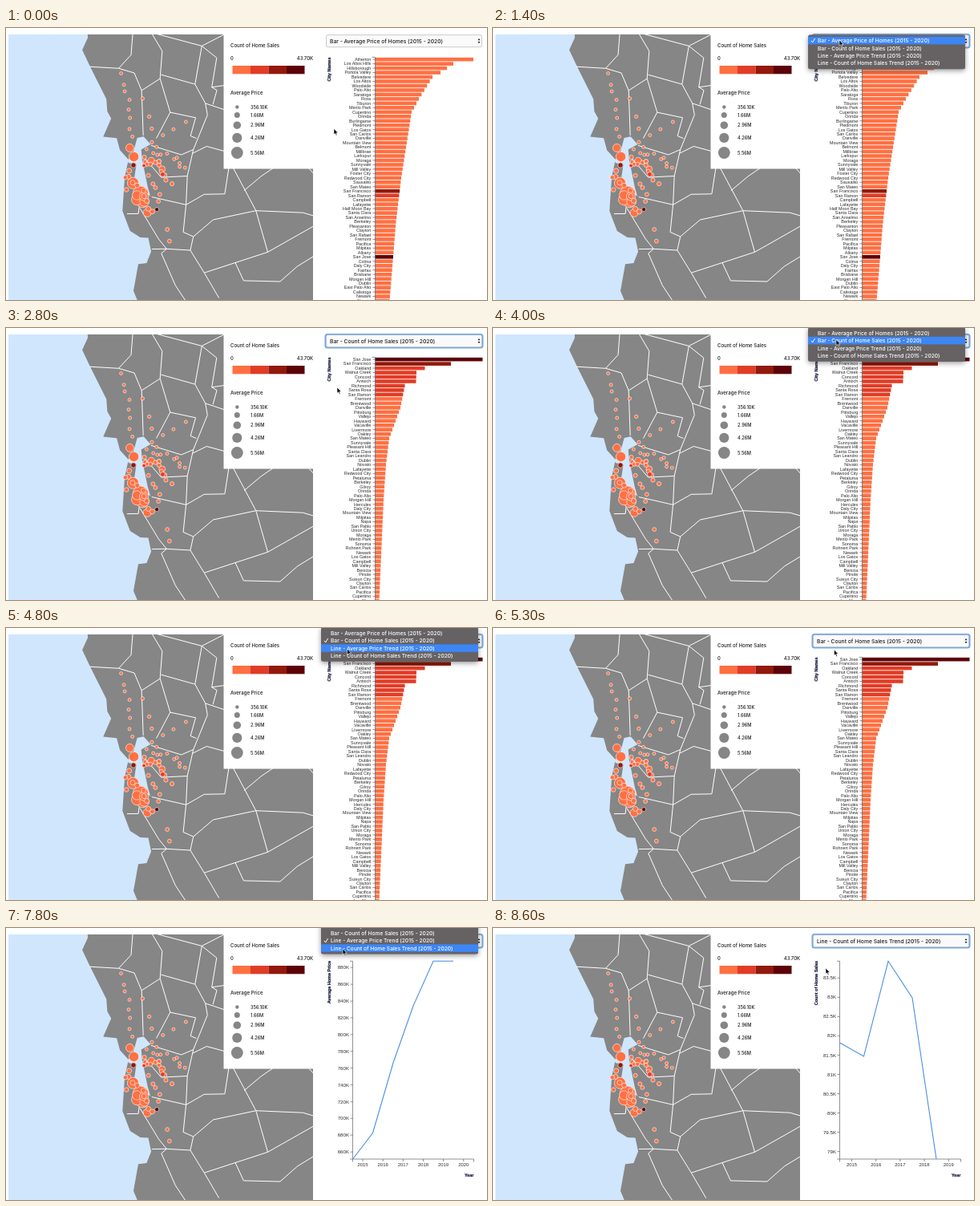
These frames come from a looping animation (600 by 339 pixels, 8700 ms). An HTML page:

```html
<!DOCTYPE html>
<html lang="en">
<head>
<meta charset="utf-8">
<title>Home sales dashboard</title>
<style>
html, body { margin: 0; width: 100%; height: 100%; overflow: hidden; background: #fff; }
svg { display: block; width: 100vw; height: 100vh; }
text { font-family: "Liberation Sans", Arial, sans-serif; fill: #2b2b2b; }
.ui text { font-family: Inter, sans-serif; font-weight: 500; fill: #1c1c1c; }
.ui .light { fill: #fff; }
.end { text-anchor: end; }
.mid { text-anchor: middle; }
.title { font-weight: bold; font-size: 5.5px; fill: #101440; stroke: #101440; stroke-width: .2; }
.axis { fill: none; stroke: #45474f; stroke-width: .6; }
.trend { fill: none; stroke: #4a8fe3; stroke-width: 1.1; }
.border { fill: none; stroke: #fff; stroke-width: 1; stroke-linejoin: round; }
.homes circle { stroke: #fff; stroke-width: .6; }
#menu { filter: drop-shadow(0 2px 3px rgba(0, 0, 0, .4)); }
</style>
</head>
<body>
<svg viewBox="0 0 600 339" preserveAspectRatio="none">
  <defs><clipPath id="frame"><path d="M3 8H383V339H3z"/></clipPath></defs>
  <g clip-path="url(#frame)">
    <path fill="#d0e6fd" d="M3 8H383V339H3z"/>
    <path id="land" fill="#868686"/>
    <path id="bay" fill="#d0e6fd"/>
    <g class="border" id="borders"></g>
    <g class="homes" id="homes"></g>
  </g>
  <g class="ui" id="legend"><path fill="#fff" d="M271.500 7H384V175.500H271.500z"/></g>
  <g id="charts"></g>
  <g class="ui" id="select">
    <rect id="ring" x="398.500" y="8" width="196" height="16.500" rx="2.500" fill="none" stroke="#6fa5ee" stroke-width="2"/>
    <rect x="399.500" y="8.700" width="194" height="15" rx="2" fill="#fafafa" stroke="#b5b5b5" stroke-width=".7"/>
    <path d="M588.500 15.300l1.500-2.300 1.500 2.300zM588.500 17l1.500 2.300 1.500-2.300z" fill="#222"/>
  </g>
  <g class="ui" id="menu"></g>
  <path id="cursor" d="M0 0V7.300L1.700 5.800 2.800 8.400 4 7.900 2.900 5.300H5.200z" fill="#000" stroke="#fff" stroke-width=".6"/>
</svg>
<script>
const LOOP = 8700, STEP = 100;
const ORANGE = '#ff7043', RED = '#e13c26', BROWN = '#92190b', DARK = '#5c0208', GREY = '#868686';
const byId = id => document.getElementById(id);

function add(parent, tag, attrs, content) {
  const node = document.createElementNS('http://www.w3.org/2000/svg', tag);
  for (const key in attrs) node.setAttribute(key, attrs[key]);
  if (content !== undefined) node.textContent = content;
  return parent.appendChild(node);
}
const label = (parent, x, y, size, content, cls = '') =>
  add(parent, 'text', { x, y, 'font-size': size, class: cls }, content);
const path = (parent, d, cls) => add(parent, 'path', { d, class: cls });
const show = (node, on) => { node.style.display = on ? '' : 'none'; };

// Interpolates between stops of the form [position, ...values]
function sample(stops, at, ease = p => p) {
  const next = stops.findIndex(stop => stop[0] > at);
  if (next < 1) return stops.at(next).slice(1);
  const from = stops[next - 1], to = stops[next];
  const p = ease((at - from[0]) / (to[0] - from[0]));
  return from.slice(1).map((v, i) => v + (to[i + 1] - v) * p);
}

// Albers conic projection centred on 96 W, with San Francisco as the anchor
const RAD = Math.PI / 180, SCALE = 5820;
const s1 = Math.sin(29.5 * RAD), s2 = Math.sin(45.5 * RAD), cone = (s1 + s2) / 2;
function albers(west, lat) {
  const rho = SCALE * Math.sqrt(1 + s1 * s2 - 2 * cone * Math.sin(lat * RAD)) / cone;
  const theta = cone * (96 - west) * RAD;
  return [rho * Math.sin(theta), rho * Math.cos(theta)];
}
const [anchorX, anchorY] = albers(122.43, 37.77);
function project([west, lat]) {
  const [x, y] = albers(west, lat);
  return [x - anchorX + 159, y - anchorY + 171];
}
const parse = route => route.split(' ').map(pair => pair.split(',').map(Number));
const trace = route => 'M' + parse(route).map(p => project(p).map(v => v.toFixed(1))).join('L');

// Coast, bay and county lines as degrees west, degrees north
byId('land').setAttribute('d', trace('123.8,39.35 123.69,39.1 123.72,38.94 123.52,38.77 123.13,38.45 123.06,38.31 122.97,38.24 123.01,38 122.8,38.03 122.7,37.9 122.53,37.82 122.51,37.6 122.4,37.2 122.2,36.99 122.02,36.95 121.9,36.97 121.8,36.82 121.82,36.67 121.94,36.63 121.9,36.3 121.6,36') + 'H400V0z');
byId('bay').setAttribute('d', trace('122.56,37.81 122.46,37.86 122.49,37.94 122.49,38.1 122.4,38.14 122.26,38.07 122.38,37.98 122.32,37.86 122.24,37.74 122.12,37.56 122.04,37.46 122.14,37.5 122.36,37.61 122.39,37.79 122.51,37.78') + 'z');
[
  '123.53,38.77 123.08,38.85 122.82,38.85 122.63,38.67 122.41,38.15',
  '123.08,38.85 122.95,39.05 123.1,39.6',
  '122.63,38.67 122.4,38.87 122.49,39.2 122.74,39.38 122.78,39.8',
  '122.4,38.92 121.84,38.92 121.9,39.39 121.62,39.3 121.57,38.94 121.48,38.92 121.48,38.74',
  '122.74,39.38 121.9,39.39 121.6,39.6',
  '122.4,38.87 122.1,38.51 122.2,38.16',
  '122.1,38.51 121.69,38.53 121.69,38.3 121.59,38.29',
  '121.84,38.92 121.6,38.73 121.52,38.6 121.59,38.15 121.75,38.05 122.25,38.06',
  '121.6,38.73 121.13,38.71 121.03,38.51 121.03,38.25',
  '121.57,38.94 121.3,39.03 120.9,39.2',
  '121.59,38.1 121.4,38.23 121,38.23 120.5,38.4 120.07,38.51',
  '121.59,38.15 121.57,37.82 121.96,37.72 122.31,37.9',
  '121.57,37.82 121.47,37.48 122.02,37.46',
  '121,38.23 120.93,37.73 121.24,37.66 121.47,37.48 121.4,37.15 121.23,37.13',
  '120.93,38.08 120.39,37.63 121,37.39 121.23,37.13 121.22,36.96 121.58,36.9',
  '122.11,37.45 122.19,37.42 122.15,37.22 122.32,37.18',
  '122.15,37.29 121.74,36.99 121.58,36.9 121.8,36.85',
  '121.58,36.9 121.64,36.83 121.3,36.5 121.04,36.32 120.6,36.2',
  '121.22,36.96 120.92,36.74 120.6,36.49',
  '120.92,36.74 120.05,37.18 119.3,37.74',
  '120.5,36.96 120.3,36.77 119.75,36.87 119.55,37.1 119.3,37.3',
  '120.39,37.63 120.05,37.18', '120.39,37.63 119.67,37.75 119.3,37.74',
  '120.65,37.83 120.45,38.05 120.02,38.43 119.2,38'
].forEach(route => path(byId('borders'), trace(route)));

function bubble(place, price, fill = ORANGE) {
  const [cx, cy] = project(place);
  add(byId('homes'), 'circle', { cx, cy, r: 1.2 + 1.53 * price, fill });
}
// Prices in millions
Object.entries({
  Atherton: [122.2, 37.46, 5.56], 'Los Altos Hills': [122.14, 37.38, 4.4], Hillsborough: [122.36, 37.56, 3.87],
  'Portola Valley': [122.23, 37.38, 3.7], Belvedere: [122.46, 37.87, 3.25], Woodside: [122.25, 37.43, 2.95],
  'Los Altos': [122.11, 37.38, 3], 'Palo Alto': [122.14, 37.44, 2.8], Saratoga: [122.02, 37.26, 2.55],
  Ross: [122.56, 37.96, 2.48], Orinda: [122.18, 37.88, 2.05], Danville: [121.98, 37.82, 1.75]
}).forEach(([, [west, lat, price]]) => bubble([west, lat], price));

// Smaller towns strung along the main roads
let seed = 7;
const jitter = amount => {
  seed = seed * 16807 % 2147483647;
  return (seed / 2147483647 - .5) * amount;
};
[
  ['123.02,38.8 122.75,38.45 122.57,38.1', 8, .5],
  ['122.58,38.58 122.29,38.3 122.25,38.1', 4, .6],
  ['121.82,38.45 122.04,38.25 122.16,38.06', 4, .5],
  ['122.3,38 122.03,37.98 121.8,38 121.64,37.91', 10, .5],
  ['122.3,37.9 122.22,37.83 122.06,37.9', 6, .9],
  ['122.06,37.9 121.95,37.76 121.77,37.68', 6, .9],
  ['122.16,37.7 121.98,37.55 121.9,37.43', 5, .8],
  ['122.47,37.69 122.32,37.56 122.08,37.39 121.95,37.29', 9, 1.2],
  ['122.5,37.6 122.43,37.46', 2, 1],
  ['121.65,37.13 121.57,37', 2, .8]
].forEach(([route, towns, price]) => {
  const stops = parse(route).map((place, i) => [i, ...place]);
  for (let i = 0; i < towns; i++) {
    const [west, lat] = sample(stops, i / (towns - 1) * (stops.length - 1));
    const shift = i % (towns - 1) ? .08 : 0;
    bubble([west + jitter(shift), lat + jitter(shift)], price);
  }
});
bubble([122.27, 37.8], .75, RED);
bubble([121.95, 37.76], 1.1, RED);
bubble([122.43, 37.77], 1.3, BROWN);
bubble([121.89, 37.33], .9, DARK);

// Legend
const legend = byId('legend');
label(legend, 280, 24.300, 6.050, 'Count of Home Sales');
label(legend, 280, 40, 5.800, '0');
label(legend, 383, 40, 5.900, '43.70K', 'end');
[ORANGE, RED, BROWN, DARK].forEach((fill, i) =>
  add(legend, 'rect', { x: 282.500 + i * 22.500, y: 47, width: 22.500, height: 10.300, fill }));
label(legend, 280, 83.200, 6.100, 'Average Price');
let dotY = 98.500;
['356.10K', '1.66M', '2.96M', '4.26M', '5.56M'].forEach((value, i) => {
  const r = 2.200 + i * 1.300;
  add(legend, 'circle', { cx: 288.300, cy: dotY, r, fill: GREY });
  label(legend, 305, dotY + 2.100, 5.650, value);
  dotY += 2 * r + 5.500 + i * .3;
});

// Charts
function sideTitle(chart, content, top) {
  const node = label(chart, 0, 0, 5.500, content, 'title end');
  node.setAttribute('transform', `translate(405 ${top}) rotate(-90)`);
}

function barChart(cities, curve) {
  const chart = add(byId('charts'), 'g');
  let ticks = 'M456.500 36.400H460.500V339';
  cities.split(',').forEach((city, i) => {
    const y = 39.100 + i * 5.470;
    add(chart, 'rect', { x: 460.500, y: y - 2.250, width: sample(curve, i)[0], height: 4.600, fill: barColors[city] || ORANGE });
    label(chart, 455.300, y + 1.900, 5.400, city, 'end');
    ticks += `M457.500 ${y}H460.500`;
  });
  path(chart, ticks, 'axis');
  sideTitle(chart, 'City Names', 36.500);
  return chart;
}

function lineChart({ title, top, gap, rows, value, firstYear, yearGap, years, line }) {
  const chart = add(byId('charts'), 'g');
  let ticks = 'M429 41.300H432.500V288H429M432.500 291.500V288H583.500V291.500';
  for (let i = 0; i < rows; i++) {
    const y = top + i * gap;
    label(chart, 428, y + 2.100, 6.150, value(i), 'end');
    ticks += `M429.500 ${y}H432.500`;
  }
  for (let i = 0; i < years; i++) {
    const x = firstYear + i * yearGap;
    label(chart, x, 297.300, 5.900, 2015 + i, 'mid');
    ticks += `M${x} 288V291`;
  }
  path(chart, ticks, 'axis');
  path(chart, line, 'trend');
  sideTitle(chart, title, 41);
  label(chart, 583.500, 310, 5.500, 'Year', 'title end');
  return chart;
}

const barColors = { 'San Jose': DARK, 'San Francisco': BROWN };
for (const city of ['Oakland', 'Walnut Creek', 'Concord', 'Antioch', 'Richmond', 'Santa Rosa', 'San Ramon']) barColors[city] = RED;

const charts = [
  barChart('Atherton,Los Altos Hills,Hillsborough,Portola Valley,Belvedere,Los Altos,Woodside,Palo Alto,Saratoga,Ross,Tiburon,Menlo Park,Cupertino,Orinda,Burlingame,Piedmont,Los Gatos,San Carlos,Danville,Mountain View,Belmont,Millbrae,Larkspur,Moraga,Sunnyvale,Mill Valley,Foster City,Redwood City,Sausalito,San Mateo,San Francisco,San Ramon,Campbell,Lafayette,Half Moon Bay,Santa Clara,San Anselmo,Berkeley,Pleasanton,Clayton,San Rafael,Fremont,Pacifica,Milpitas,Albany,San Jose,Colma,Daly City,Fairfax,Brisbane,Morgan Hill,Dublin,East Palo Alto,Calistoga,Newark,Novato',
    [[0, 122.5], [1, 97.5], [3, 81.5], [4, 71.5], [9, 54.5], [12, 45.5], [27, 32.5], [37, 26], [55, 18]]),
  barChart('San Jose,San Francisco,Oakland,Walnut Creek,Concord,Antioch,Richmond,Santa Rosa,San Ramon,Fremont,Brentwood,Danville,Pittsburg,Vallejo,Hayward,Vacaville,Livermore,Oakley,San Mateo,Sunnyvale,Pleasant Hill,Santa Clara,San Leandro,Dublin,Novato,Lafayette,Redwood City,Petaluma,Berkeley,Gilroy,Orinda,Palo Alto,Morgan Hill,Hercules,Daly City,Mountain View,Milpitas,Napa,San Pablo,Union City,Moraga,Menlo Park,Sonoma,Rohnert Park,Newark,Los Gatos,Campbell,Mill Valley,Benicia,Pinole,Suisun City,Clayton,San Carlos,Pacifica,Cupertino,Los Altos',
    [[0, 134], [1, 94.5], [2, 62], [3, 51.5], [5, 51], [6, 37], [11, 31.5], [18, 17.5], [24, 13.5], [32, 10.5], [55, 5]]),
  lineChart({
    title: 'Average Home Price', top: 49.200, gap: 20.900, rows: 12, value: i => `${880 - i * 20}K`,
    firstYear: 445, yearGap: 25.150, years: 6,
    line: 'M432.500 288L457.500 255.500 483 168 508 97 533 41.300H558'
  }),
  lineChart({
    title: 'Count of Home Sales', top: 62.300, gap: 24.030, rows: 10, value: i => `${83.5 - i / 2}K`,
    firstYear: 447.500, yearGap: 30.200, years: 5,
    line: 'M432.500 143L462.500 160 493 41.300 523 87 553 288'
  })
];

// Dropdown
const options = [
  'Bar - Average Price of Homes (2015 - 2020)', 'Bar - Count of Home Sales (2015 - 2020)',
  'Line - Average Price Trend (2015 - 2020)', 'Line - Count of Home Sales Trend (2015 - 2020)'
];
const ROW = 9.450;
const choice = label(byId('select'), 404, 18.500, 6.740, '');
const menu = byId('menu');
add(menu, 'rect', { x: 393, y: 8.500, width: 196, height: 42.800, rx: 2.500, fill: '#666263' });
const highlight = add(menu, 'rect', { x: 393, width: 196, height: ROW, fill: '#3d86f6' });
options.forEach((option, i) => label(menu, 405, 18.100 + i * ROW, 6.670, option, 'light'));
const check = add(menu, 'path', { d: 'M397 15.800l1.600 2.200 3-5', fill: 'none', stroke: '#fff', 'stroke-width': 1 });

// Timeline
const changes = [0, 2300, 5400, 8100];
const menus = [
  { open: 1100, move: 1800, close: 2200 },
  { open: 3700, move: 4500, close: 5200 },
  { open: 6700, move: 7300, close: 7900 }
];
const pointer = [
  [0, 409, 125.5], [200, 409, 125.5], [900, 432, 15], [1500, 432, 15], [1900, 431, 25], [2200, 431, 25],
  [2700, 413, 74], [3100, 413, 74], [3600, 428, 14.5], [4200, 428, 14.5], [4700, 425.5, 26], [5300, 425.5, 27],
  [5700, 418, 60], [6200, 418, 60], [6600, 421, 16], [7100, 421, 20], [7500, 420, 26], [7900, 420, 26],
  [8400, 415, 50]
];
const smooth = p => p * p * (3 - 2 * p);

function render(t) {
  const current = changes.filter(time => time <= t).length - 1;
  charts.forEach((chart, i) => show(chart, i === current));
  choice.textContent = options[current];
  show(byId('ring'), t >= menus[0].open);

  const selected = menus.findIndex(m => t >= m.open && t < m.close);
  show(menu, selected >= 0);
  if (selected >= 0) {
    const hovered = selected + (t >= menus[selected].move ? 1 : 0);
    menu.setAttribute('transform', `translate(0 ${-selected * ROW})`);
    highlight.setAttribute('y', 10.900 + hovered * ROW);
    check.setAttribute('transform', `translate(0 ${selected * ROW})`);
  }
  byId('cursor').setAttribute('transform', `translate(${sample(pointer, t, smooth)})`);
}

const start = performance.now();
function tick(now) {
  const t = Math.max(0, now - start) % LOOP;
  render(Math.floor(t / STEP) * STEP);
  requestAnimationFrame(tick);
}
render(0);
requestAnimationFrame(tick);
</script>
</body>
</html>
```
